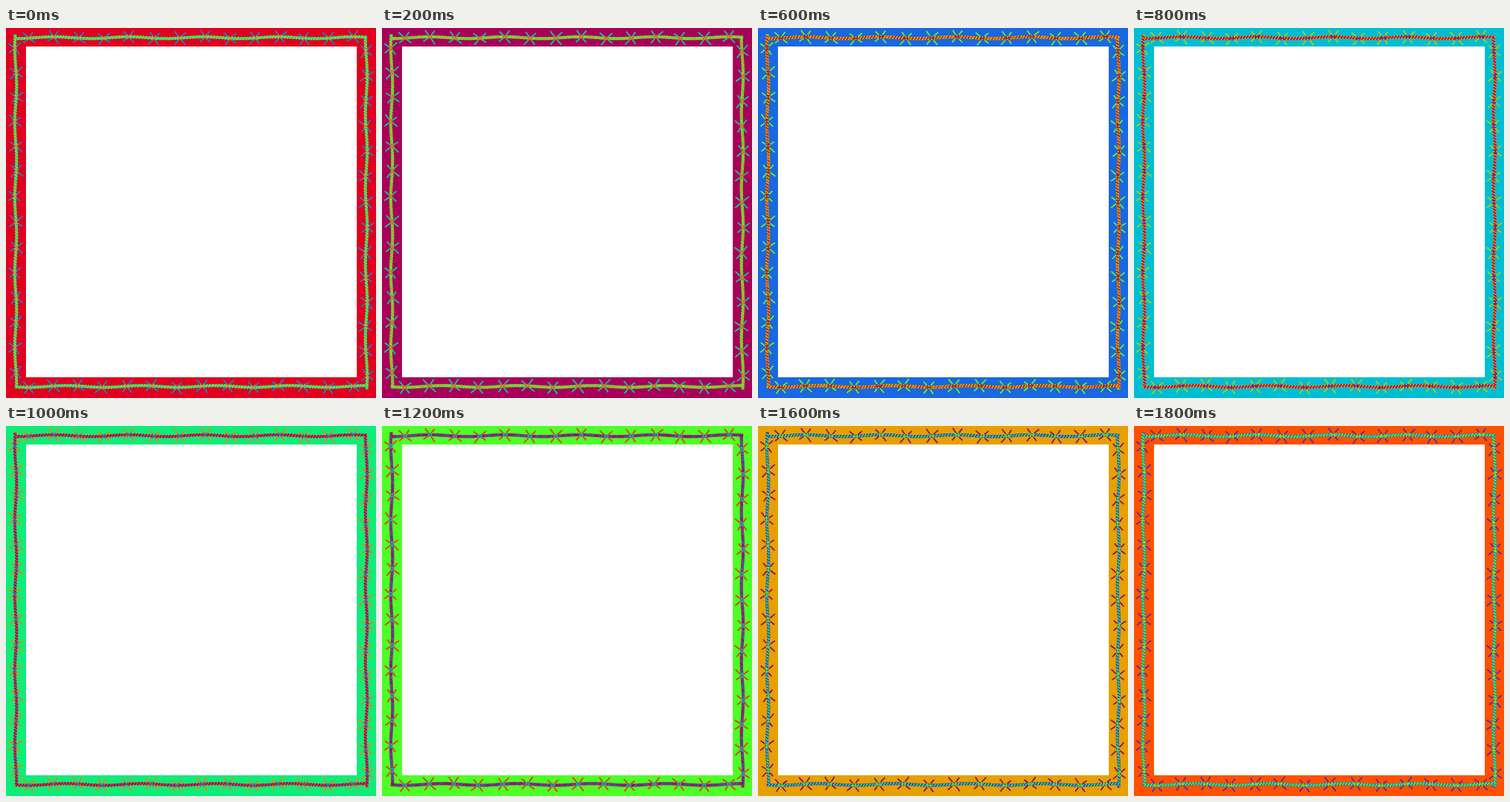
Recreate the animation shown at these times as an HTML page with a canvas. Size 500 by 500 pixels, loop 2 s.

```html
<!DOCTYPE html>
<html>
<head>
<meta charset="utf-8">
<style>
  html, body { margin: 0; width: 100%; height: 100%; overflow: hidden; background: #fff; }
  canvas { display: block; }
</style>
</head>
<body>
<canvas id="stage" width="500" height="500"></canvas>
<script>
const ctx = document.getElementById('stage').getContext('2d');
const STEP_MS = 200, BARBS = 14, SPACING = 33.7, FIRST = 31;
const PALETTE = [
  '#e2001e', '#a80058', '#6c1096', '#1a67e1', '#00bed2',
  '#0eec7a', '#4cff26', '#aadc00', '#e6a000', '#ff5000'
].map(hex => [1, 3, 5].map(i => parseInt(hex.slice(i, i + 2), 16)));

let seed;
function random() {
  seed = (seed * 16807) % 2147483647;
  return seed / 2147483647;
}

// Colour at a position on the cyclic palette.
function colour(position) {
  const p = position % 10, i = Math.floor(p), next = PALETTE[(i + 1) % 10];
  return `rgb(${PALETTE[i].map((v, k) => Math.round(v + (next[k] - v) * (p - i)))})`;
}

function line(x0, y0, x1, y1, width, stroke) {
  ctx.beginPath();
  ctx.moveTo(x0, y0);
  ctx.lineTo(x1, y1);
  ctx.lineWidth = width;
  ctx.strokeStyle = stroke;
  ctx.stroke();
}

// The wire dips once every three barbs.
const wireY = x => 13.1 - 1.2 * Math.cos(2 * Math.PI * ((x - FIRST) / SPACING - 1) / 3);
// Barbs are evenly spaced, bunched slightly past the middle.
const barbX = i => FIRST + SPACING * i + 2.8 * Math.exp(-(((i - 8.5) / 3) ** 2));

function drawWire(step) {
  for (let x = 12; x < 488; x += 2) {
    line(x, wireY(x), x + 2.2, wireY(x + 2.2), 4, colour(step + 4.1));
  }
  for (let x = 13; x < 488; x += 4) {
    const y = wireY(x);
    line(x - 1.5, y + 1.8, x + 1.5, y - 1.8, 1.9, colour(step + 6.2 + random()));
  }
}

function drawBarb(x, y, step) {
  for (const sx of [-1, 1]) for (const sy of [-1, 1]) {
    const angle = 0.8 + (random() - 0.5) * 0.4, reach = 10 + random() * 2.5;
    const dx = sx * Math.cos(angle), dy = sy * Math.sin(angle);
    line(x + dx, y + dy, x + dx * reach, y + dy * reach, 1.7, colour(step + 3.1));
    line(x + dx, y + dy, x + dx * reach * 0.9, y + dy * reach * 0.9, 0.8, colour(step + 3.8));
  }
  for (const d of [-2, 2]) line(x + d, y + 3, x + d, y - 3, 1.4, colour(step + 8));
  line(x - 2, y, x + 2, y, 1.5, colour(step + 7.6));
}

function drawSide(step) {
  seed = 41;
  drawWire(step);
  for (let i = 0; i < BARBS; i++) drawBarb(barbX(i), wireY(barbX(i)), step);
}

function draw(step) {
  ctx.fillStyle = colour(step);
  ctx.fillRect(0, 0, 500, 500);
  ctx.fillStyle = '#fff';
  ctx.fillRect(27, 25, 447, 447);
  // One side, turned a quarter for each edge.
  [[0, 0], [500, 0.5], [500, 497.5], [0, 496.5]].forEach(([x, y], turn) => {
    ctx.save();
    ctx.translate(x, y);
    ctx.rotate(turn * Math.PI / 2);
    drawSide(step);
    ctx.restore();
  });
}

let shown = -1;
function tick() {
  const step = Math.floor(performance.now() / STEP_MS) % 10;
  if (step !== shown) draw(shown = step);
  requestAnimationFrame(tick);
}
tick();
</script>
</body>
</html>
```
